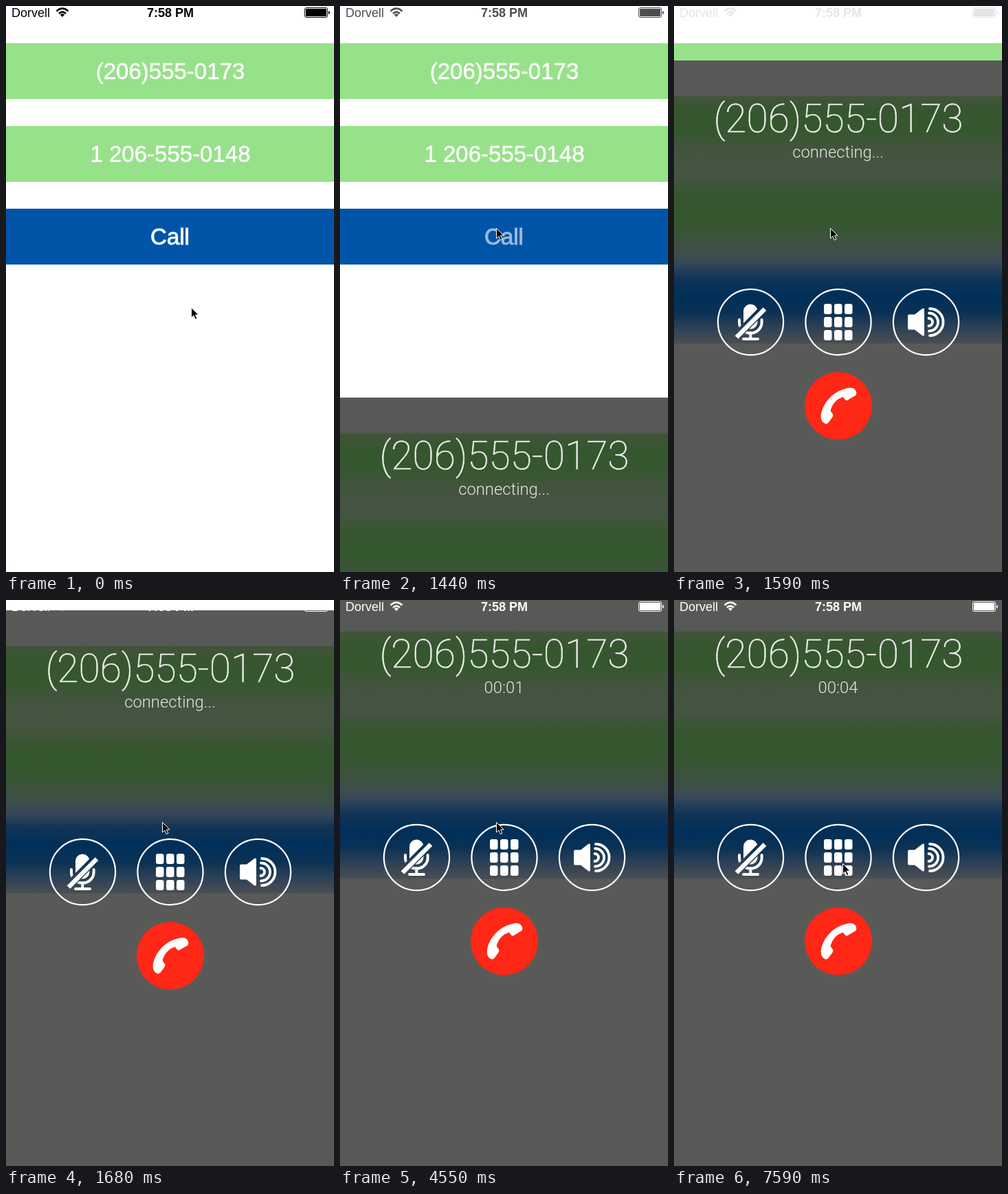
An HTML page that plays this animation: 477 px wide and 821 px high, repeating every 8 s.

```html
<!DOCTYPE html>
<html lang="en">
<head>
<meta charset="utf-8">
<title>Call screen</title>
<style>
  html, body { margin: 0; width: 100%; height: 100%; overflow: hidden; background: #fff; }
  svg { display: block; width: 477px; height: 821px; }

  text { font-family: "Liberation Sans", Arial, sans-serif; }
  .mid { text-anchor: middle; }
  .label { font-size: 33px; fill: #fff; stroke: #fff; stroke-width: .5px; }
  .call { stroke-width: .9px; }
  .bar { font-size: 18px; fill: currentColor; }
  .number { font: 200 57px Roboto, sans-serif; fill: #ececea; stroke: #ececea; stroke-width: .7px; }
  .state { font: 300 23.8px Roboto, sans-serif; fill: #e6e6e4; }

  .call, .panel, .status, .rows, .cursor { animation: 8s step-end infinite; }
  .call { animation-name: press; }
  .panel { animation-name: slide; }
  .status { animation-name: tint; }
  .rows { animation-name: count; }
  .cursor { animation-name: move; }

  @keyframes press {
    0% { opacity: 1; }
    16% { opacity: .25; }
    18% { opacity: .6; }
    18.75%, 100% { opacity: 1; }
  }
  /* critically damped spring, held on the screen's refresh times */
  @keyframes slide {
    0% { transform: translateY(830px); }
    18% { transform: translateY(574px); }
    18.75% { transform: translateY(295.5px); }
    19.875% { transform: translateY(85px); }
    21% { transform: translateY(21px); }
    22.125% { transform: translateY(5px); }
    23.25% { transform: translateY(1px); }
    24%, 100% { transform: translateY(0); }
  }
  @keyframes tint {
    0% { color: #000; }
    18% { color: #4d4d4d; }
    18.75% { color: #a3a3a3; }
    19.875% { color: #e5e5e5; }
    21%, 100% { color: #fff; }
  }
  @keyframes count {
    0% { transform: translateY(0); }
    56.875% { transform: translateY(-40px); }
    69.375% { transform: translateY(-80px); }
    82.125% { transform: translateY(-120px); }
    94.875%, 100% { transform: translateY(-160px); }
  }
  @keyframes move {
    0% { transform: translate(269px, 437px); }
    .75% { transform: translate(269px, 437px); animation-timing-function: steps(5, jump-both); }
    5.5% { transform: translate(227px, 322px); }
    66.625% { transform: translate(227px, 322px); animation-timing-function: steps(12, jump-both); }
    76.125%, 100% { transform: translate(245px, 382px); }
  }
</style>
</head>
<body>
<svg viewBox="0 0 477 821" width="477" height="821">
  <defs>
    <linearGradient id="blur" gradientUnits="userSpaceOnUse" x1="0" y1="0" x2="0" y2="500">
      <stop offset="0" stop-color="#595a58"/>
      <stop offset=".09" stop-color="#565855"/>
      <stop offset=".093" stop-color="#42543a"/>
      <stop offset=".135" stop-color="#36562f"/>
      <stop offset=".19" stop-color="#35572e"/>
      <stop offset=".25" stop-color="#43543e"/>
      <stop offset=".32" stop-color="#465543"/>
      <stop offset=".375" stop-color="#385531"/>
      <stop offset=".43" stop-color="#33572c"/>
      <stop offset=".49" stop-color="#3a5438"/>
      <stop offset=".545" stop-color="#3f4f4a"/>
      <stop offset=".575" stop-color="#364858"/>
      <stop offset=".62" stop-color="#113456"/>
      <stop offset=".67" stop-color="#002f59"/>
      <stop offset=".72" stop-color="#0b3255"/>
      <stop offset=".76" stop-color="#2b4056"/>
      <stop offset=".808" stop-color="#4a4e53"/>
      <stop offset=".81" stop-color="#585a58"/>
      <stop offset="1" stop-color="#595a58"/>
    </linearGradient>
    <clipPath id="window"><rect x="120" y="112" width="240" height="33"/></clipPath>
    <mask id="cut" maskUnits="userSpaceOnUse" x="60" y="320" width="100" height="100">
      <rect x="60" y="320" width="100" height="100" fill="#fff"/>
      <path d="M84 400.500L138 346.500" stroke="#000" stroke-width="12"/>
    </mask>
    <rect id="key" width="11.5" height="15" rx="3"/>
    <g id="keys">
      <use href="#key"/><use href="#key" x="15"/><use href="#key" x="30"/>
    </g>
  </defs>

  <rect width="477" height="821" fill="#fff"/>
  <path d="M0 54H477V135H0ZM0 174H477V255H0Z" fill="#98e18b"/>
  <path d="M0 294H477V375H0Z" fill="#0055a8"/>
  <text class="label mid" x="239" y="105.5">(206)555-0173</text>
  <text class="label mid" x="239" y="225.5">1 206-555-0148</text>
  <text class="label call mid" x="238.5" y="345.5">Call</text>

  <g class="panel">
    <rect y="-6" width="477" height="840" fill="url(#blur)"/>
    <text class="number mid" x="239" y="97.5">(206)555-0173</text>
    <g clip-path="url(#window)">
      <g class="rows">
        <text class="state mid" x="238.5" y="135">connecting...</text>
        <text class="state mid" x="238.5" y="175">00:01</text>
        <text class="state mid" x="238.5" y="215">00:02</text>
        <text class="state mid" x="238.5" y="255">00:03</text>
        <text class="state mid" x="238.5" y="295">00:04</text>
      </g>
    </g>

    <g fill="none" stroke="#fff" stroke-width="2.2">
      <circle cx="111.5" cy="373.5" r="47.6"/>
      <circle cx="239" cy="373.5" r="47.6"/>
      <circle cx="366.5" cy="373.5" r="47.6"/>
    </g>

    <g mask="url(#cut)">
      <rect x="101" y="347.5" width="20.5" height="36" rx="10.2" fill="#fff"/>
      <path d="M95 370V374a16.3 15.5 0 0 0 32.6 0V370M111.3 389V397M101 398H122"
        fill="none" stroke="#fff" stroke-width="4" stroke-linecap="round"/>
    </g>
    <path d="M91 395.500L132 354.500" stroke="#fff" stroke-width="6.5"/>

    <g fill="#fff">
      <use href="#keys" x="218" y="347"/>
      <use href="#keys" x="218" y="366"/>
      <use href="#keys" x="218" y="385"/>
      <path d="M342 362.500H350L361 354Q364 352.500 364 355.500V391.500Q364 394.500 361 393L350 384.500H342Q340 384.500 340 382.500V364.500Q340 362.500 342 362.500Z"/>
    </g>
    <g fill="none" stroke="#fff" stroke-width="3.8" stroke-linecap="round">
      <path d="M370.500 368A5.500 5.500 0 0 1 370.500 379"/>
      <path d="M371 360.500A13 13 0 0 1 371 386.500"/>
      <path d="M372 354A19.500 19.500 0 0 1 372 393"/>
    </g>

    <circle cx="239" cy="495" r="49" fill="#ff2716"/>
    <path fill="#fff" d="M250 470Q258 467 263 471Q267 476 264 480L252 487Q249 488 246 482Q233 486 228 500Q227 503 231 507Q232 509 230 512L224 520Q220 523 216 518Q210 510 219 493Q231 474 250 470Z"/>
  </g>

  <g class="status">
    <text class="bar" x="8" y="16">Dorvell</text>
    <text class="bar mid" x="239" y="16" font-weight="bold">7:58 PM</text>
    <g fill="none" stroke="currentColor" stroke-width="2.5">
      <path d="M73.500 7.500Q82 -.5 90.500 7.500M77 11Q82 6.300 87 11"/>
    </g>
    <path d="M78.800 12.600Q82 10 85.200 12.600L82 16Z" fill="currentColor"/>
    <rect x="434.500" y="2.500" width="33" height="14" rx="2.500" fill="none" stroke="currentColor"/>
    <rect x="436" y="4" width="30" height="11" rx="1" fill="currentColor"/>
    <path d="M469 7Q471 7.500 471 9.500T469 12Z" fill="currentColor"/>
  </g>

  <path class="cursor" d="M.5 .5V15L3.900 11.900L6.300 17.500L8.900 16.400L6.500 11H11Z" fill="#000" stroke="#fff"/>
</svg>
</body>
</html>
```
